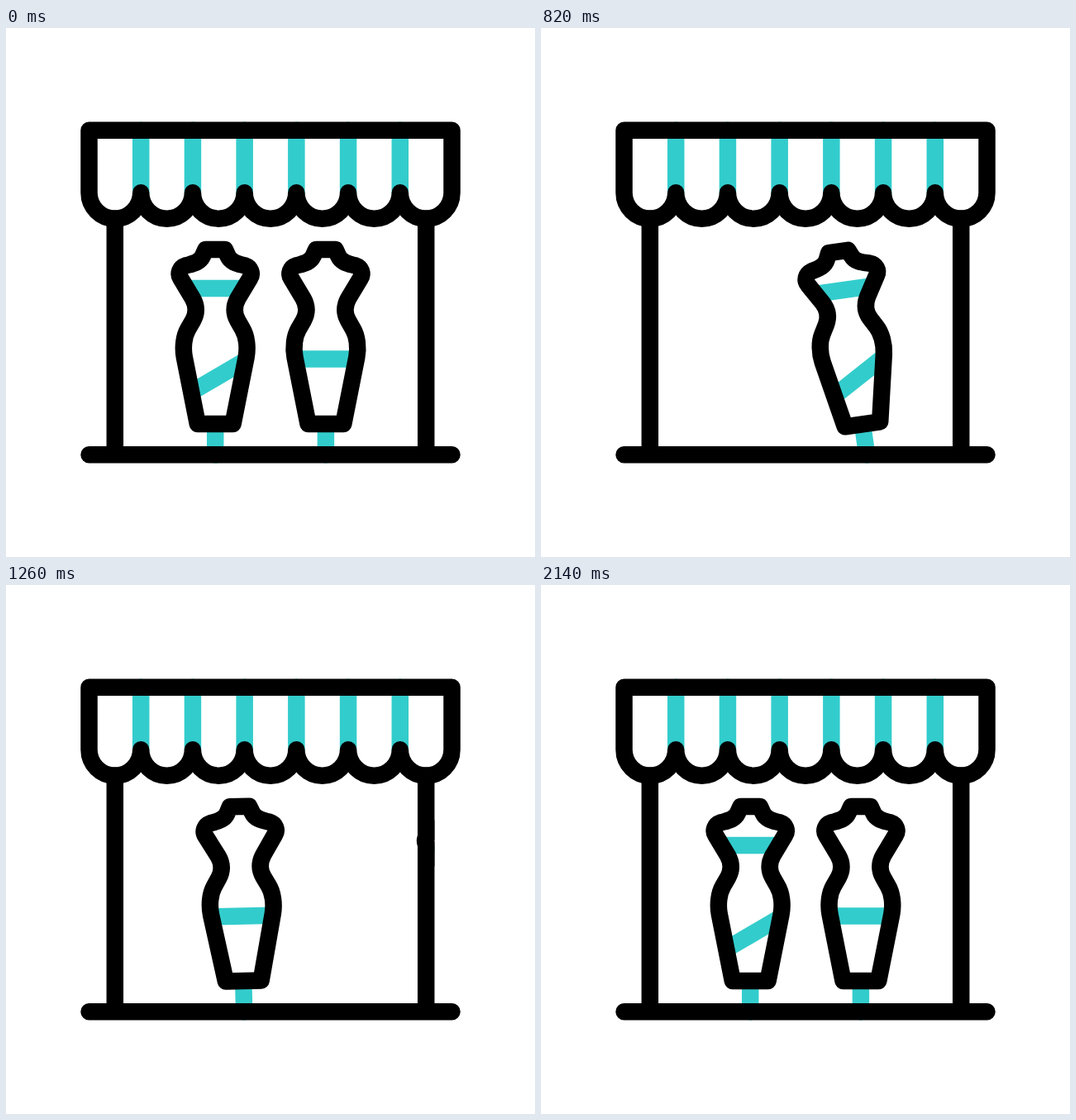
An HTML page that plays this animation: 640x640 px, repeating every 2400 ms.

```html
<!DOCTYPE html>
<html lang="en">
<head>
<meta charset="utf-8">
<title>Shop window</title>
<style>
  html, body { margin: 0; width: 100%; height: 100%; overflow: hidden; background: #fff; }
  svg { display: block; width: 100vw; height: 100vh; }
  path { fill: none; stroke: #000; stroke-width: 20.5; stroke-linecap: round; stroke-linejoin: round; }
  .teal { stroke: #33cccc; }
  .flat { stroke-linecap: butt; }
</style>
</head>
<body>
<svg viewBox="0 0 640 640">
  <defs>
    <clipPath id="window"><rect x="121.6" y="230" width="396.8" height="300"/></clipPath>
    <!-- Mannequins stand on the origin -->
    <g id="body">
      <path class="teal" d="M0 -37V0"/>
      <path d="M-11.7 -248.3H11.7L15.2 -240.5C19 -232 28 -231 36 -228.8C43 -226.5 45.5 -219 42 -213.5L27.3 -189C22.6 -180.5 22.3 -171 27 -162.5L33 -152C38 -143.5 39.6 -130 37.4 -118L21.4 -37.3H-21.4L-37.4 -118C-39.6 -130 -38 -143.5 -33 -152L-27 -162.5C-22.3 -171 -22.6 -180.5 -27.3 -189L-42 -213.5C-45.5 -219 -43 -226.5 -36 -228.8C-28 -231 -19 -232 -15.2 -240.5Z"/>
    </g>
    <g id="sash">
      <path class="teal flat" d="M-35 -201.2H35M-29 -75.8L37.5 -114.8"/>
      <use href="#body"/>
    </g>
    <g id="belt">
      <path class="teal flat" d="M-37 -115.8H37"/>
      <use href="#body"/>
    </g>
  </defs>
  <g id="stage" clip-path="url(#window)"></g>
  <path d="M131.8 230.6V516.3M508.2 230.6V516.3M100.5 516.3H539.5"/>
  <path id="stripes" class="teal"/>
  <path id="awning"/>
</svg>
<script>
  const LOOP = 2400, STEP = 20, FLOOR = 516.3;
  const LEAN = -12, LEAN_TIME = 850, LEAN_LEAD = 140;
  const EXIT_SHIFT = 345, EXIT_TIME = 866, ENTRY_X = 47;
  const SCALLOP = 62.714;

  const byId = id => document.getElementById(id);

  const valleys = [1, 2, 3, 4, 5, 6].map(i => 100.5 + i * SCALLOP);
  byId('stripes').setAttribute('d', valleys.map(x => `M${x} 123.7V199.3`).join(''));
  const r = SCALLOP / 2;
  byId('awning').setAttribute('d',
    'M539.5 199.3V123.7H100.5V199.3' + `a${r} ${r} 0 0 0 ${SCALLOP} 0`.repeat(7));

  function ease(time, start, duration) {
    const u = Math.min(1, Math.max(0, (time - start) / duration));
    return u * u * (3 - 2 * u);
  }

  function addCopy(shape) {
    const use = document.createElementNS('http://www.w3.org/2000/svg', 'use');
    use.setAttribute('href', '#' + shape);
    byId('stage').append(use);
    return use;
  }

  const mannequins = [
    { shape: 'sash', home: 253.2, leave: 300, enter: 1058, arrive: 1881 },
    { shape: 'belt', home: 386.9, leave: 0, enter: 695, arrive: 1573 }
  ].map(m => ({ ...m, leaving: addCopy(m.shape), entering: addCopy(m.shape) }));

  function place(copy, visible, x, angle) {
    copy.setAttribute('visibility', visible ? 'visible' : 'hidden');
    copy.setAttribute('transform', `translate(${x} ${FLOOR}) rotate(${angle})`);
  }

  function draw(t) {
    for (const m of mannequins) {
      const moveOut = m.leave + LEAN_LEAD;
      place(m.leaving, t < moveOut + EXIT_TIME,
        m.home + EXIT_SHIFT * ease(t, moveOut, EXIT_TIME),
        LEAN * ease(t, m.leave, LEAN_TIME));

      const upright = m.arrive - LEAN_LEAD;
      place(m.entering, t >= m.enter,
        ENTRY_X + (m.home - ENTRY_X) * ease(t, m.enter, m.arrive - m.enter),
        LEAN * (1 - ease(t, upright - LEAN_TIME, LEAN_TIME)));
    }
  }

  const began = performance.now();
  function tick() {
    const t = (performance.now() - began) % LOOP;
    draw(Math.floor(t / STEP) * STEP);
    requestAnimationFrame(tick);
  }
  tick();
</script>
</body>
</html>
```
